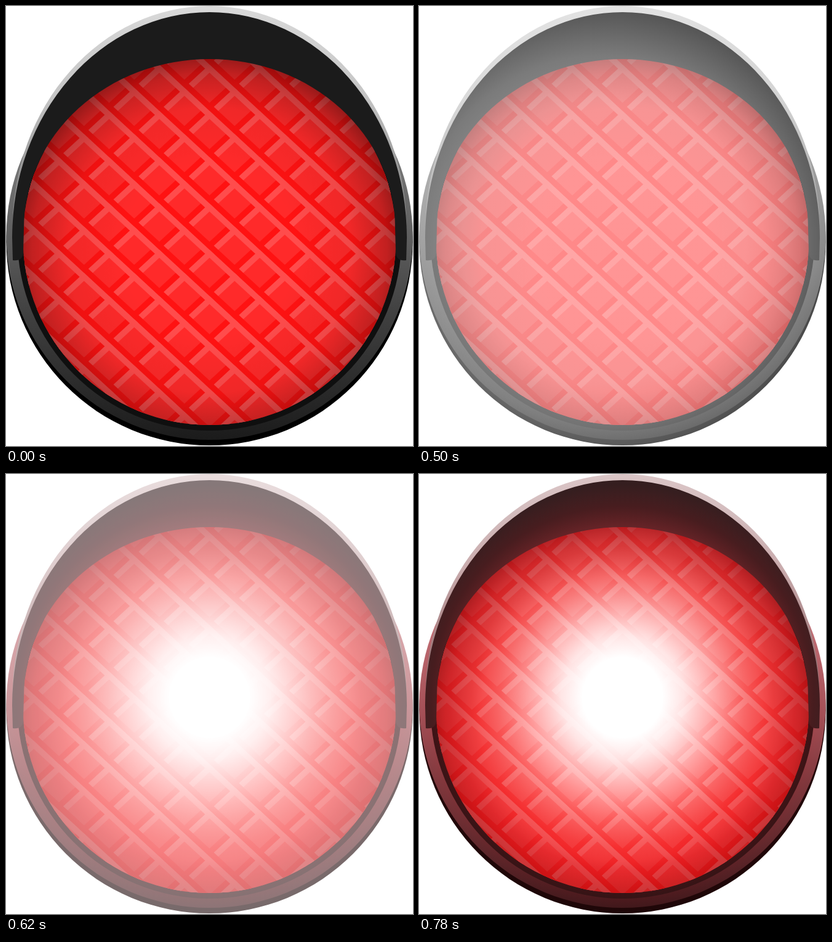
These frames come from a looping animation (661 by 713 pixels, 0.82 s). An HTML page with a canvas:

```html
<!DOCTYPE html>
<html lang="en">
<head>
<meta charset="utf-8">
<title>Flashing signal lamp</title>
<style>
  html, body { margin: 0; width: 100%; height: 100%; overflow: hidden; background: #fff; }
  canvas { display: block; }
</style>
</head>
<body>
<canvas id="stage" width="661" height="713"></canvas>
<script>
const ctx = document.getElementById('stage').getContext('2d');
const CX = 330.5, LOOP = 820;

const white = a => `rgba(255,255,255,${a})`;
const black = a => `rgba(0,0,0,${a})`;

function addStops(gradient, stops) {
  for (const [at, color] of stops) gradient.addColorStop(at, color);
  return gradient;
}

// Stops are [distance in px, color]
function radial(x, y, stops) {
  const r = stops[stops.length - 1][0];
  return addStops(ctx.createRadialGradient(x, y, 0, x, y, r), stops.map(([d, c]) => [d / r, c]));
}

function vertical(y0, y1, stops) {
  return addStops(ctx.createLinearGradient(0, y0, 0, y1), stops);
}

function disc(y, r, fill) {
  ctx.fillStyle = fill;
  ctx.beginPath();
  ctx.arc(CX, y, r, 0, Math.PI * 2);
  ctx.fill();
}

function lattice() {
  const pitch = 75, slope = 0.92, reach = 320;
  ctx.lineWidth = 9.7;
  for (const m of [-slope, slope]) {
    for (let k = -9; k <= 9; k++) {
      for (const [shift, color] of [[-6.5, '#ff1212'], [6.5, '#ff4c4c']]) {
        const y = 320 + k * pitch + shift;
        ctx.strokeStyle = color;
        ctx.beginPath();
        ctx.moveTo(CX - reach, y - m * reach);
        ctx.lineTo(CX + reach, y + m * reach);
        ctx.stroke();
      }
    }
  }
}

function lens() {
  ctx.save();
  ctx.beginPath();
  ctx.arc(CX, 376, 303, 0, Math.PI * 2);
  ctx.clip();
  disc(376, 304, '#ff2a2a');
  lattice();
  disc(376, 304, radial(CX, 396, [
    [0, black(0)], [140, black(0)], [232, black(.06)], [288, black(.24)], [325, black(.48)]
  ]));
  ctx.restore();
}

function visor() {
  ctx.fillStyle = vertical(0, 300, [[0, '#d9d9d9'], [.5, '#c4c4c4'], [1, '#8a8a8a']]);
  ctx.beginPath();
  ctx.ellipse(CX, 360, 320, 360, 0, Math.PI, 0);
  ctx.ellipse(CX, 375, 318, 363, 0, 0, Math.PI, true);
  ctx.fill();

  ctx.fillStyle = '#1b1b1b';
  ctx.beginPath();
  ctx.moveTo(11, 412);
  ctx.lineTo(10, 375);
  ctx.ellipse(CX, 375, 320.5, 365, 0, Math.PI, 0);
  ctx.lineTo(650, 412);
  ctx.quadraticCurveTo(634, 414, 633, 400);
  ctx.lineTo(632, 360);
  ctx.ellipse(CX, 360, 301.5, 274, 0, 0, Math.PI, true);
  ctx.lineTo(28, 400);
  ctx.quadraticCurveTo(27, 414, 11, 412);
  ctx.fill();
}

function lamp(warm) {
  const body = warm ? ['#b87c82', '#96585e', '#6b3a3e', '#261416'] : ['#777', '#5c5c5c', '#404040', '#1b1b1b'];
  ctx.globalCompositeOperation = 'source-over';
  ctx.clearRect(0, 0, 661, 713);
  disc(382, 330, '#000');
  disc(373, 330, vertical(250, 703, body.map((c, i) => [[0, .3, .55, 1][i], c])));
  disc(376, 312, '#0f0f0f');
  lens();
  visor();
}

// Tints only the pixels the lamp already covers
function tint(fill) {
  ctx.globalCompositeOperation = 'source-atop';
  ctx.fillStyle = fill;
  ctx.fillRect(0, 0, 661, 713);
}

const redGlow = () => tint(radial(CX, 362, [
  [0, white(1)], [65, white(1)], [100, white(.88)], [150, white(.58)],
  [200, 'rgba(255,235,235,.32)'], [245, 'rgba(250,120,125,.28)'],
  [280, 'rgba(235,50,60,.35)'], [310, 'rgba(230,35,45,.22)'],
  [345, 'rgba(230,50,60,.13)'], [420, 'rgba(230,50,60,.08)']
]));

const poses = [
  { until: 500, draw() { lamp(false); } },
  { until: 600, draw() {
    lamp(false);
    tint(radial(300, 380, [[0, white(.5)], [230, white(.5)], [300, white(.42)], [400, white(.2)]]));
  } },
  { until: 620, draw() {
    lamp(true);
    tint(radial(295, 380, [
      [0, white(1)], [160, white(1)], [230, white(.95)], [279, white(.87)],
      [312, white(.76)], [332, white(.66)], [350, white(.57)], [420, white(.35)]
    ]));
  } },
  { until: 720, draw() { lamp(true); redGlow(); tint(white(.4)); } },
  { until: LOOP, draw() { lamp(true); redGlow(); } }
];

let shown;
function tick() {
  const t = performance.now() % LOOP;
  const pose = poses.find(p => t < p.until);
  if (pose !== shown) {
    pose.draw();
    shown = pose;
  }
  requestAnimationFrame(tick);
}
tick();
</script>
</body>
</html>
```
